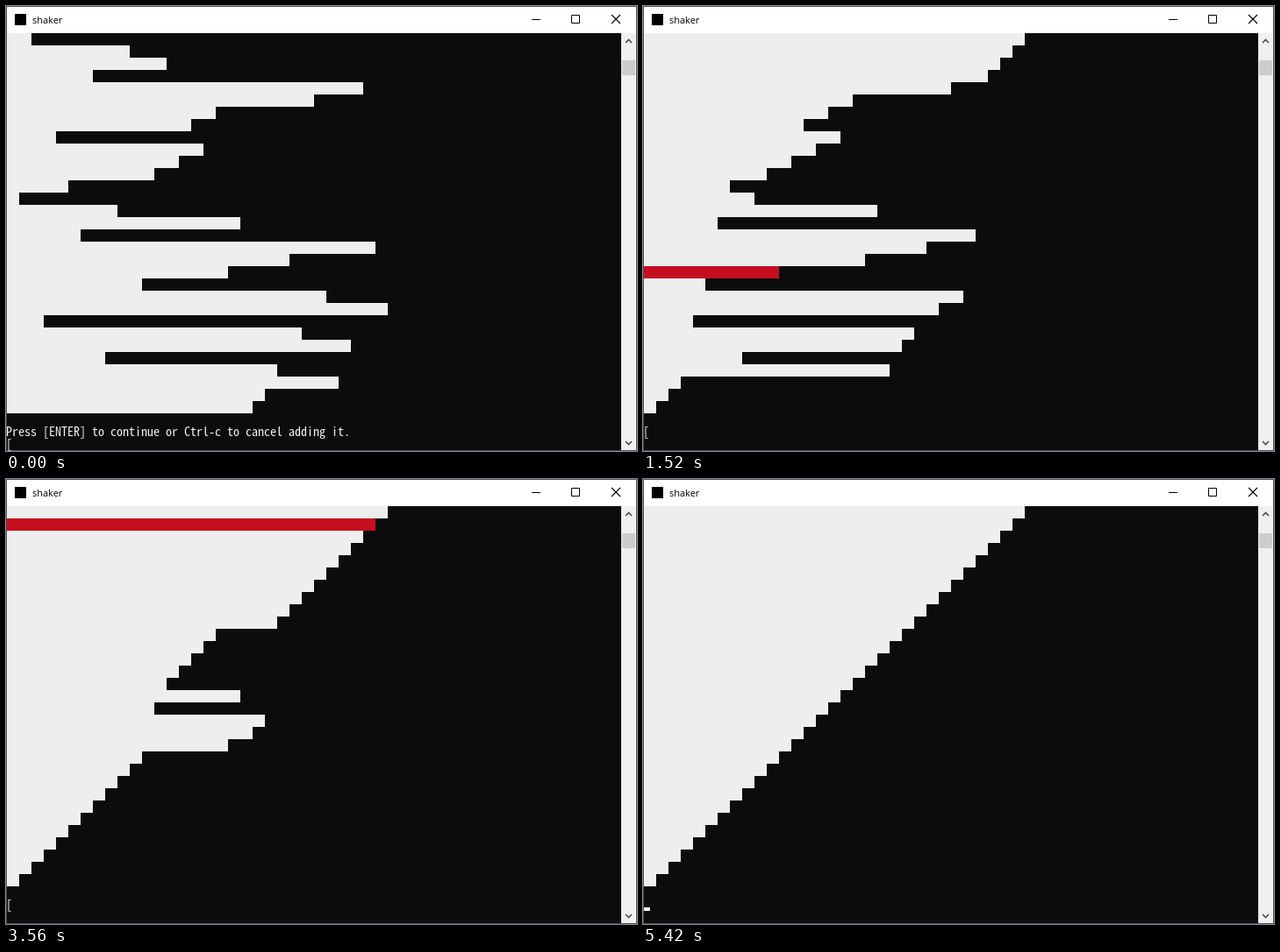
An HTML page for the animation above (5610 ms loop, 719 by 508 pixels).

```html
<!DOCTYPE html>
<html lang="en">
<head>
<meta charset="utf-8">
<title>shaker</title>
<style>
  html, body { margin: 0; width: 100%; height: 100%; overflow: hidden; background: #fff; }
  svg { display: block; }
  rect { shape-rendering: crispEdges; }
  .title { font: 11px "Open Sans", "Noto Sans", sans-serif; fill: #000; }
  .console { font: 14px "Noto Sans Mono CJK JP", "Liberation Mono", monospace; fill: #f2f2f2; white-space: pre; }
  .line { fill: none; stroke: #000; }
  .arrow { fill: none; stroke: #505050; stroke-width: 1.7; }
</style>
</head>
<body>
<svg width="719" height="508" viewBox="0 0 719 508">
  <!-- window frame and title bar -->
  <rect width="719" height="508" fill="#4a4f66"/>
  <rect x="1" y="1" width="717" height="30" fill="#fff"/>
  <rect x="10" y="9" width="13" height="13" fill="#000"/>
  <text class="title" x="30" y="20">shaker</text>
  <path class="line" d="M599 15.5h10M644.5 10.5h9v9h-9z"/>
  <path class="line" d="M690 10l10 10M700 10l-10 10" stroke-width="1.1"/>

  <!-- console and scroll bar -->
  <rect x="1" y="31" width="700" height="476" fill="#0c0c0c"/>
  <rect x="701" y="31" width="17" height="476" fill="#f0f0f0"/>
  <rect x="702" y="62" width="15" height="17" fill="#cdcdcd"/>
  <path class="arrow" d="M706 42l3.5-3.5 3.5 3.5M706 497l3.5 3.5 3.5-3.5"/>

  <g id="bars"></g>
  <text class="console" id="prompt" x="0" y="491">Press [ENTER] to continue or Ctrl-c to cancel adding it.</text>
  <text class="console" id="bracket" x="0" y="491">[</text>
  <rect id="cursor" x="1" y="489" width="7" height="4" fill="#fff"/>
</svg>
<script>
const LOOP = 5610, LEAD = 80, TICK = 20, CELL = 14, TOP = 31;
const START = [2, 10, 13, 7, 29, 25, 17, 15, 4, 16, 14, 12, 5, 1, 9, 19,
  6, 30, 23, 18, 11, 26, 31, 3, 24, 28, 8, 22, 27, 21, 20];
const SPAN = START.length - 1;

// Pace of the sort: [tick, comparisons done before it]
const PACE = [[0, 0], [1, 0], [27, 73], [33, 90], [44, 120], [72, 199], [76, 210],
  [87, 239], [98, 270], [109, 301], [130, 360], [174, 481], [195, 540], [205, 570],
  [210, 584], [236, 661], [246, 690], [260, 730], [267, 750]];
const LAST = PACE[PACE.length - 1];

const $ = id => document.getElementById(id);
const prompt = $("prompt"), bracket = $("bracket"), cursor = $("cursor");

const bars = START.map((_, row) => {
  const bar = document.createElementNS("http://www.w3.org/2000/svg", "rect");
  bar.setAttribute("x", 1);
  bar.setAttribute("y", TOP + row * CELL);
  bar.setAttribute("height", CELL);
  $("bars").append(bar);
  return bar;
});

// Console cells are 7px wide
const advance = prompt.getComputedTextLength() / prompt.textContent.length;
for (const el of [prompt, bracket]) el.style.fontSize = 14 * 7 / advance + "px";

function stepAt(tick) {
  if (tick >= LAST[0]) return LAST[1];
  const i = PACE.findIndex(p => p[0] > tick) - 1;
  const [t0, s0] = PACE[i], [t1, s1] = PACE[i + 1];
  return s0 + Math.floor((tick - t0) * (s1 - s0) / (t1 - t0));
}

// Even passes run down, odd passes run back up
function rowAt(step) {
  const k = step % SPAN;
  return Math.floor(step / SPAN) % 2 ? SPAN - k : k;
}

function sortUntil(step) {
  const list = [...START];
  for (let s = 0; s <= step; s++) {
    const up = Math.floor(s / SPAN) % 2;
    const a = rowAt(s) - up;
    if (list[a] < list[a + 1]) [list[a], list[a + 1]] = [list[a + 1], list[a]];
  }
  return list;
}

function draw(time) {
  const tick = Math.floor((time - LEAD) / TICK);
  const waiting = tick < 0, done = tick >= LAST[0];
  const step = waiting ? -1 : stepAt(tick);
  const active = waiting || done ? -1 : rowAt(step);

  sortUntil(step).forEach((value, row) => {
    bars[row].setAttribute("width", value * CELL);
    bars[row].setAttribute("fill", row === active ? "#c50f1f" : "#eee");
  });
  prompt.style.display = waiting ? "" : "none";
  bracket.style.display = done ? "none" : "";
  bracket.setAttribute("y", waiting ? 505 : 491);
  cursor.style.display = done ? "" : "none";
}

const begin = performance.now();
function frame() {
  draw((performance.now() - begin) % LOOP);
  requestAnimationFrame(frame);
}
frame();
</script>
</body>
</html>
```
